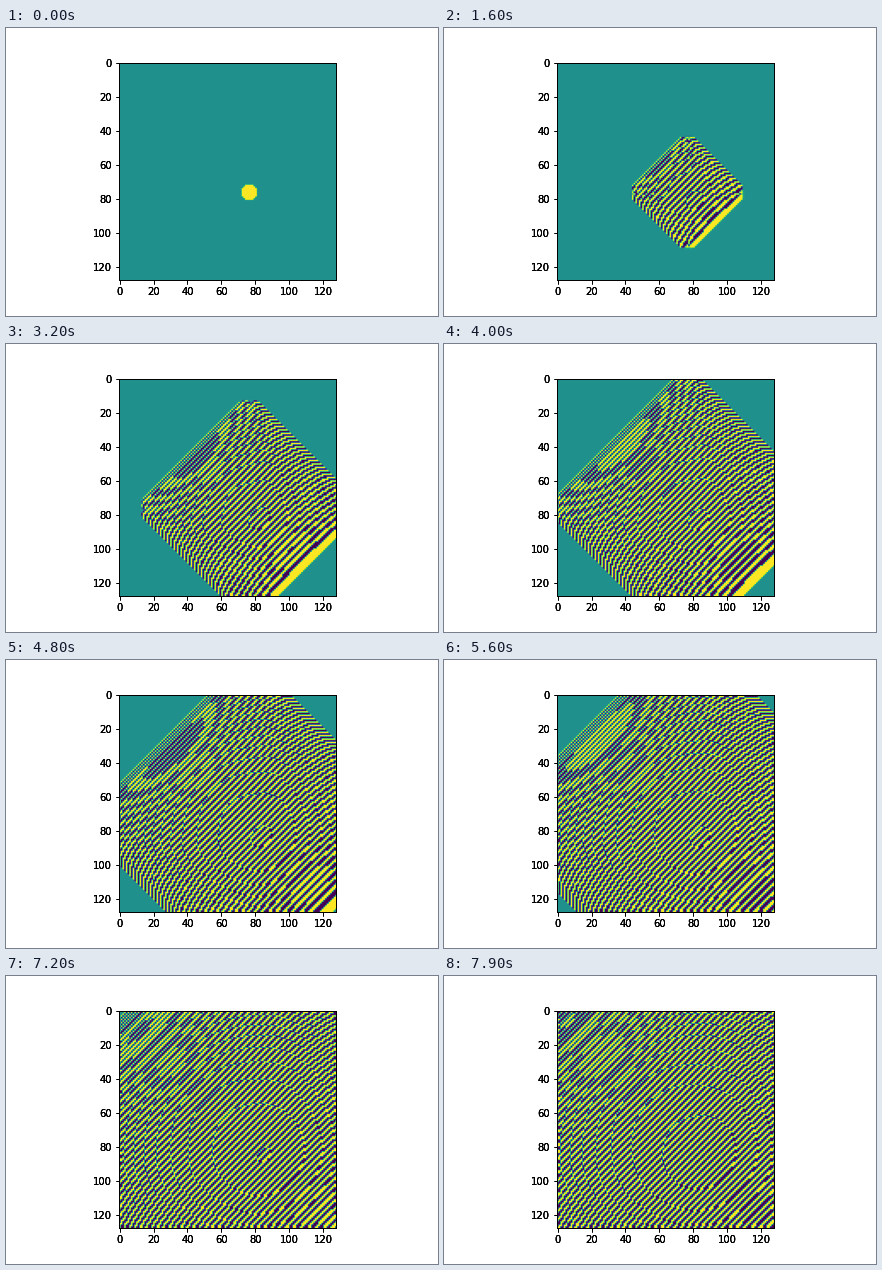
A matplotlib script for the animation above (8 s loop, 432x288 px).

```python
import numpy as np
import matplotlib.pyplot as plt
from matplotlib.animation import FuncAnimation

SIZE = 128
FRAMES = 80
INTERVAL = 100
COURANT = 1.65      # large enough to make the explicit scheme unstable
CENTER, RADIUS = 76, 5

plt.rcParams.update({
    "font.family": "DejaVu Sans",
    "font.size": 10,
    "figure.subplot.left": 0.125,
    "figure.subplot.right": 0.9,
    "figure.subplot.bottom": 0.125,
    "figure.subplot.top": 0.88,
})


def initial_disc():
    y, x = np.mgrid[:SIZE, :SIZE]
    inside = (x - CENTER) ** 2 + (y - CENTER) ** 2 < RADIUS ** 2
    return inside.astype(float)


def advect(field):
    """One forward-time, centred-space step towards the lower right."""
    dy, dx = np.gradient(field)
    return field - COURANT * (dx + dy)


def steps_at(frame):
    return max(2 * frame - 2, min(frame, 1))


def simulate():
    field, done, shots = initial_disc(), 0, []
    for frame in range(FRAMES):
        while done < steps_at(frame):
            field = advect(field)
            done += 1
        shots.append(np.clip(field, -1, 1))
    return shots


shots = simulate()
fig = plt.figure(figsize=(6, 4), dpi=72, facecolor="white")
ax = fig.add_subplot()
image = ax.imshow(shots[0], cmap="viridis", vmin=-1, vmax=1)

# Stacked copies of the axes give the labels their heavy, dark edges.
for _ in range(2):
    overlay = fig.add_subplot(facecolor="none")
    overlay.set(xlim=ax.get_xlim(), ylim=ax.get_ylim(), aspect="equal")

for axes in fig.axes:
    axes.set_xticks(range(0, SIZE, 20))
    axes.set_yticks(range(0, SIZE, 20))


def update(frame):
    image.set_data(shots[frame])
    return [image]


anim = FuncAnimation(fig, update, frames=FRAMES, interval=INTERVAL,
                     repeat=True, repeat_delay=0)
plt.show()
```
